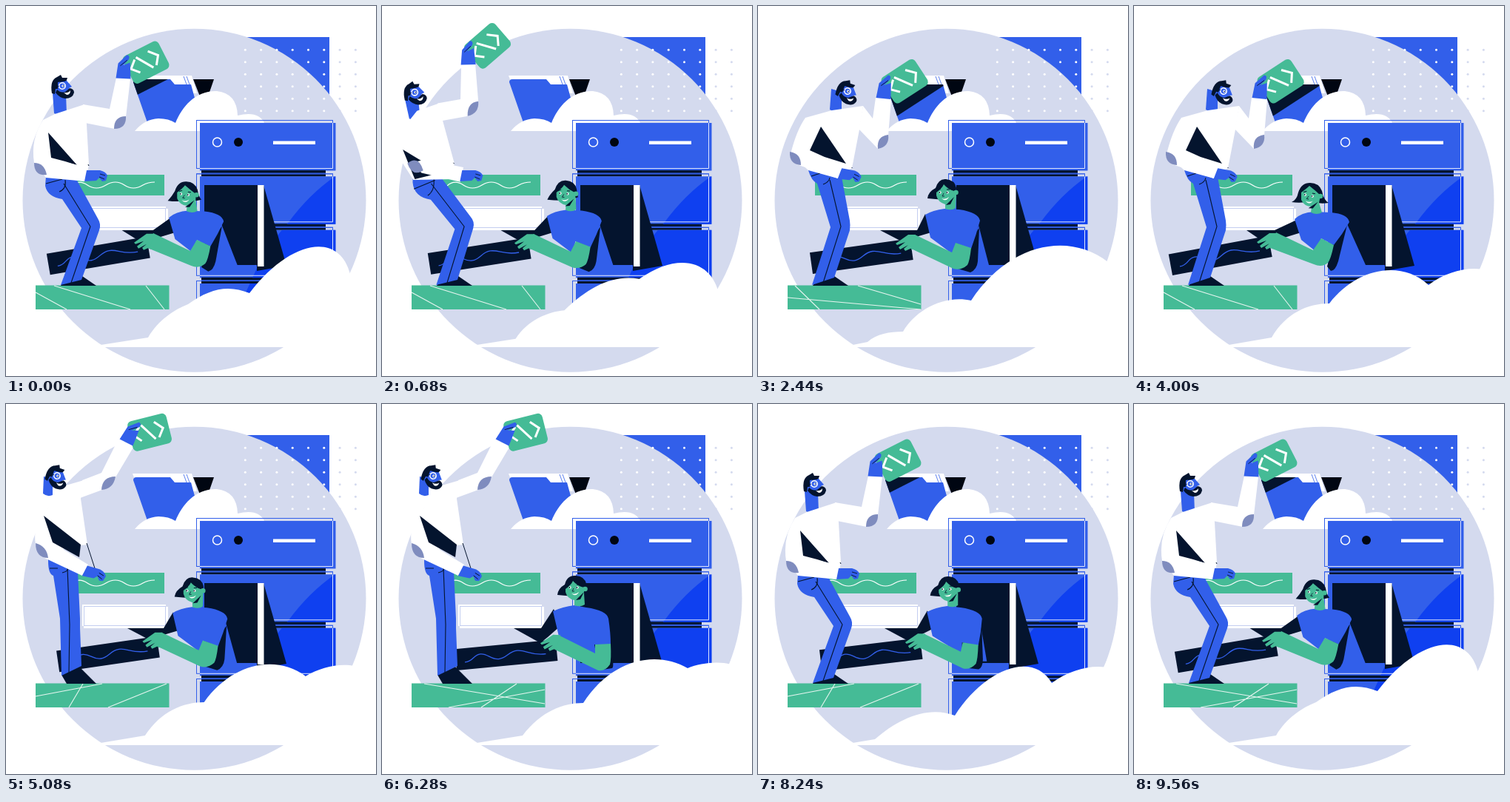
Animation, 500 px wide and 500 px high, one loop 9600 ms. Source, as an HTML page:

```html
<!DOCTYPE html>
<html lang="en">
<head>
<meta charset="utf-8">
<title>Cloud server</title>
<style>
html, body { margin: 0; width: 100%; height: 100%; overflow: hidden; background: #fff; }
svg { display: block; width: 100vw; height: 100vh; }
</style>
</head>
<body>
<svg id="stage" viewBox="0 0 500 500" fill="none"></svg>
<script>
const LOOP = 9600;
const BLUE = '#325fea', DEEP = '#0f40f0', DARK = '#04142e', GREEN = '#45bb96';
const PALE = '#d4daee', WHITE = '#fff', PATCH = '#7f8cbe';
const stage = document.getElementById('stage');

function el(tag, attrs, parent = stage) {
  const n = document.createElementNS('http://www.w3.org/2000/svg', tag);
  for (const k in attrs) n.setAttribute(k, attrs[k]);
  return parent.appendChild(n);
}
const shape = (d, fill, parent) => el('path', { d, fill }, parent);
const line = (d, stroke, w = 1, parent) => el('path', { d, stroke, 'stroke-width': w }, parent);
const box = (x, y, w, h, fill, parent) => el('rect', { x, y, width: w, height: h, fill }, parent);
const disc = (cx, cy, r, fill, parent) => el('circle', { cx, cy, r, fill }, parent);

// Blend two strings that differ only in their numbers.
const NUM = /-?\d+(\.\d+)?/g;
function mix(a, b, k) {
  if (k <= 0) return a;
  if (k >= 1) return b;
  const nums = b.match(NUM);
  let i = 0;
  return a.replace(NUM, v => (+v + (nums[i++] - v) * k).toFixed(2));
}
// Finds the two neighbouring keys and the eased share between them.
function span(keys, t) {
  let i = 0;
  while (i < keys.length - 2 && t >= keys[i + 1][0]) i++;
  const [t0, a] = keys[i], [t1, b] = keys[i + 1];
  const k = Math.min(1, Math.max(0, (t - t0) / (t1 - t0)));
  return [a, b, (1 - Math.cos(Math.PI * k)) / 2];
}

const manParts = [], girlParts = [];
function morph(list, poses, fill, stroke, w = 1) {
  const n = el('path', fill ? { fill } : { stroke, 'stroke-width': w });
  list.push([n, 'd', poses]);
}
function rigid(list, poses, parent) {
  const n = el('g', {}, parent);
  list.push([n, 'transform', poses.map(([x, y, r]) => `translate(${x} ${y}) rotate(${r})`)]);
  return n;
}

// Backdrop
box(323, 42, 114, 100, BLUE);
disc(254.5, 262.8, 232, PALE);
for (let r = 0; r < 6; r++)
  for (let c = 0; c < 8; c++)
    disc(323.3 + c * 21.3, 59.3 + r * 16.5, 1.5, c < 6 ? WHITE : PALE);

// Folder
const FRONT = 'M172 103Q172 99 176 99L222 99L228 106L250 106L262 150L240 169L195 169Z';
shape(FRONT, '', el('clipPath', { id: 'front' }));
shape('M253 99H281L272 125L262 122Z', '#000612');
shape('M171 94H251L258 118H180Z', WHITE);
shape(FRONT, BLUE);
line('M240 95L244 106M244 95L248 106', BLUE, .8);
const shade = el('g', { 'clip-path': 'url(#front)' });
const CARD = [[189, 76, -27], [124.5, 45, -46], [198, 101.5, -33], [194, 38, -14]];
box(-60, -20, 120, 54, DARK, rigid(manParts, CARD, shade));
shape('M174 169Q187 153 206 152Q220 152 229 158C238 136 256 114 285 115Q312 118 313 148Q341 141 349 158V169Z', WHITE);

// Server
const units = [154, 226.3, 298.8, 371];
units.forEach((y, i) => {
  el('rect', { x: 257.5, y: y + .5, width: 184, height: 65, stroke: BLUE });
  box(262, y + 4, 183.5, 64.5, BLUE);
  if (i < 3) {
    box(264, y + 68, 168, 8.5, DARK);
    box(264, y + 71.5, 168, 1, BLUE);
  }
});
const lit = el('clipPath', { id: 'lit' });
units.slice(1).forEach(y => box(262, y + 4, 183.5, 64.5, '', lit));
el('path', { d: 'M445 230Q410 254 382 292L350 330L300 440H446Z', fill: DEEP, 'clip-path': 'url(#lit)' });
units.forEach(y => line(`M262 ${y + 65.5}H441.5V${y + 4}`, '#dfe6ff'));
units.slice(1).forEach(y => line(`M257.5 ${y + 4}V${y + .5}H441.5V${y + 4}`, BLUE));
el('circle', { cx: 285.5, cy: 184, r: 6, stroke: WHITE, 'stroke-width': 1.5 });
disc(314, 184, 6, '#000612');
box(361, 182.5, 57, 4.5, WHITE);
box(268, 242, 72, 108, DARK);
shape('M348 242L379 351L339 358V350Z', DARK);
box(340, 242, 8.5, 110, WHITE);

// Boards
box(77, 228, 137, 28, GREEN);
line('M88 243Q98 234 110 242T135 242T160 242T185 242Q192 238 201 238', WHITE, 1.2);
const plank = rigid(girlParts, [[52, 364, -10.5], [74, 362, -8], [101, 360, -5.4]]);
box(0, -29, 137, 29, DARK, plank);
line('M12 -10C24 -10 24 -19 34 -19S47 -10 58 -10S72 -19 84 -19S102 -10 122 -11', BLUE, 1.3, plank);
box(105, 274, 114, 29, WHITE);
box(103, 271, 113, 29, WHITE);
el('rect', { x: 105.5, y: 273.5, width: 110, height: 26, stroke: '#c3cdf0' });

// Woman
morph(girlParts, [
  'M152 303L190 303L222 288L226 306L187 318L174 318Z',
  'M165 303L215 303L226 281L234 306L207 314L192 317Z',
  'M178 303L215 303L232 277L241 300L224 315L214 323Z'], DARK);
morph(girlParts, [
  'M285 288L313 350L272 350L280 320Z',
  'M298 296L312 350L292 350L290 330Z',
  'M304 300L306 345L306 345L304 330Z'], BLUE);
morph(girlParts, [
  'M288 296L276 345Q272 358 266 358L261 352L270 318Z',
  'M299 300L297 345Q296 356 287 360L270 355L280 325Z',
  'M306 300L312 345Q313 356 311 357L298 359L300 330Z'], DARK);
morph(girlParts, [
  'M217 288Q226 279 243 278L266 279Q289 281 291 292Q282 308 270 323L253 314L246 332L226 316Z',
  'M226 282Q236 276 252 274L272 275Q298 279 300 290Q295 309 288 328L266 320L264 336L233 313Z',
  'M231 280Q244 274 260 272L276 275Q304 279 306 290Q309 310 309 325L287 325L290 341L239 314Z'], BLUE);
morph(girlParts, [
  'M253 314L270 323Q266 342 262 347Q254 354 243 349L184 327L192 306L242 330Z',
  'M267 320L288 327Q286 345 283 350Q274 358 264 355L205 327L212 309L262 333Z',
  'M288 325L309 324Q310 345 308 352Q301 362 292 360L232 331L240 313L288 337Z'], GREEN);
const palm = rigid(girlParts, [[188, 316, 0], [208, 318, 0], [236, 321, 2]]);
shape('M5 -9L-5 -9L-22 3L-20 5L-9 1L-18 8L-16 11L-5 5L-11 10L-9 13L0 9L1 11L-1 12Z', GREEN, palm);
morph(girlParts, [
  'M213 265Q220 262 222 252Q226 239 238 239Q250 239 254 250Q256 262 263 266Q250 268 240 264Q225 267 213 265Z',
  'M229 260Q230 251 240 246Q244 233 254 234Q266 235 268 246Q268 250 266 254Q262 258 252 262Q240 261 229 260Z',
  'M237 258Q238 249 247 244Q250 231 262 232Q274 233 276 243Q276 248 274 252Q270 256 260 260Q248 259 237 258Z'], DARK);
morph(girlParts, [
  'M226 252Q234 246 237 243Q246 250 252 256L250 266L254 279Q247 283 239 279L240 271Q230 271 226 262Z',
  'M241 252Q249 246 251 241Q257 248 265 250L268 256L267 273Q262 277 253 274L253 268Q243 265 241 256Z',
  'M248 250Q256 244 258 239Q264 246 273 248L273 256L274 271Q268 275 260 272L260 265Q250 263 248 254Z'], GREEN);
disc(0, 0, 3.3, GREEN, rigid(girlParts, [[252, 257, 0], [267.5, 252, 0], [274.5, 250, 0]]));
const look = rigid(girlParts, [[236, 257, 12], [251, 253, 0], [259, 249, 0]]);
for (const x of [-5, 5]) {
  disc(x, -1, 1.7, WHITE, look);
  disc(x - .6, -1, .9, DARK, look);
}
line('M-8 -4L-4 -6M4 -5L8 -5', DARK, 1, look);
line('M0 0L-2 4H1', DARK, .8, look);
shape('M-3 7Q3 9 7 5Q5 10 0 9Z', WHITE, look);
shape('M3 16L14 5L9 15Z', DARK, look);

// Green base with changing scratches
box(40, 377.5, 180.5, 32.5, GREEN);
const scratch = line('', '#e6f5f0', 1.1);
const SCRATCHES = [
  'M40 387L82 410M65 378L168 410M189 378L214 410',
  'M40 395L130 378M104 378L85 410M217 378L138 410',
  'M50 378L83 410M135 378L220 403M40 394L220 410',
  'M57 378L220 405M90 410L220 386M182 378L134 410'];

// Man
morph(manParts, [
  'M74 378L79 369L103 365L122 378Z', 'M74 378L79 369L103 365L122 378Z',
  'M74 378L79 369L103 365L122 378Z', 'M82 378L75 366L98 354L122 378Z'], DARK);
morph(manParts, [
  'M54 230L95 234L124 287Q129 295 126 303L102 370L74 377L102 300L76 261Q56 258 53 243Z',
  'M37 234L72 228L118 284Q125 291 122 300L102 370L73 377L97 302L62 262Q38 258 37 236Z',
  'M68 220L113 231L124 290Q125 296 124 303L103 367L73 377L98 299L80 240Q72 236 68 222Z',
  'M57 208L97 226L100 290Q100 297 100 303L102 354L75 367L73 290L64 232Q57 230 57 212Z'], BLUE);
morph(manParts, [
  'M78 240L114 298L88 374', 'M62 240L110 298L88 374',
  'M97 235L112 298L88 374', 'M83 222L86 298L85 363'], '', DARK, 1.1);
morph(manParts, [
  'M54 240L76 234M80 235Q82 247 72 251', 'M39 250L70 236M66 232Q68 250 58 258',
  'M72 230L84 226M97 232Q96 238 88 241', 'M59 222L70 222M84 222Q84 226 76 228'], '', DARK, 1.1);
// neck
morph(manParts, [
  'M63 118L81 120L82 146Q73 150 65 145Z', 'M19 130L37 132L40 153Q33 158 26 155Z',
  'M99 112L113 116L113 141Q105 145 97 140Z', 'M51 98L63 100L63 123Q56 126 50 121Z'], BLUE);
morph(manParts, [
  'M50 154L66 146L106 133L109 160L112 214L108 237L54 232L38 212Q33 180 50 154Z',
  'M28 160L40 140L66 131L72 154L92 211L92 233L38 236L20 206Q16 180 28 160Z',
  'M64 151L100 141L142 135L137 167L127 219L108 233L68 222L44 200Q52 168 64 151Z',
  'M50 151L74 112L105 103L101 128L110 190L101 191L57 200L40 190Q36 165 50 151Z'], WHITE);
morph(manParts, [
  'M111 214L112 216', 'M91 211L92 212', 'M127 218L127 219', 'M109 188L120 222'], '', DARK);
morph(manParts, [
  'M104 133L140 139L149 97L168 98L162 150L147 166L107 158Z',
  'M64 131L93 121L91 72L110 71L118 122L104 142L72 154Z',
  'M142 135L155 152L159 124L180 126L176 175L162 193L136 166Z',
  'M103 103L129 93L152 47L173 57L148 99L130 116L100 127Z'], WHITE);
morph(manParts, [
  'M146 166Q146 149 162 149Q163 166 146 166Z',
  'M104 142Q103 123 118 121Q119 138 104 142Z',
  'M162 193Q160 176 176 174Q178 190 162 193Z',
  'M129 116Q130 98 148 98Q145 115 129 116Z'], PATCH);
const card = rigid(manParts, CARD);
el('rect', { x: -27, y: -20.5, width: 54, height: 41.5, rx: 6, fill: GREEN }, card);
line('M-12 -10L-22 -1L-13 9M-9 -12L6 11M9 -12L19 -1L11 10', WHITE, 3, card);
const grip = rigid(manParts, [[158.5, 98, 3], [100.5, 72, -3], [169.5, 125, 6], [162.5, 52, 27]]);
shape('M-10 0L-8 -20L3 -32Q8 -32 6 -26L-1 -18L8 -22L10 0Z', BLUE, grip);
line('M-5 -17L4 -25', DARK, .9, grip);
morph(manParts, [
  'M57 171L96 215L80 210L61 205Z', 'M17 203L72 228L56 237L38 245Z',
  'M85 163L119 213L90 204L70 195Z', 'M51 151L101 190L99 207L63 187Z'], DARK);
morph(manParts, [
  'M40 210L58 206L110 218L106 237L52 229Z', 'M40 213L56 208L110 218L106 238L54 224Z',
  'M44 199L62 193L114 216L108 233L52 214Z', 'M42 190L60 186L111 217L103 232L52 208Z'], WHITE);
morph(manParts, [
  'M38 212Q52 212 55 228Q38 230 38 212Z', 'M33 213Q48 197 56 220Q42 232 33 213Z',
  'M43 197Q58 199 58 215Q42 214 43 197Z', 'M40 188Q55 192 57 208Q40 208 40 188Z'], PATCH);
const hand = rigid(manParts, [[108, 229, 0], [107, 229, 0], [111, 226, 10], [107, 225, 16]]);
shape('M1 -7L19 -7Q27 -5 29 0L27 7L22 8L18 3L14 7L-2 8Z', BLUE, hand);
line('M19 -2L26 0M18 2L25 5', DARK, .9, hand);

const head = rigid(manParts, [[76, 108, 0], [32, 120, -5], [121, 115, 20], [69, 97, 20]]);
shape('M-14 10Q-17 -8 -7 -12L-2 -15L0 -11L7 -11L5 -5L-4 -2L-6 12Z', DARK, head);
shape('M-6 -5L6 -7L13 1L9 3L9 12L-4 15L-10 11L-9 4L-6 4Z', BLUE, head);
shape('M-7 5Q-2 10 4 8L10 3Q16 4 16 9Q14 17 4 17Q-4 16 -9 9Z', DARK, head);
shape('M2 9Q8 10 11 6Q11 12 6 12Z', WHITE, head);
el('circle', { r: 4.2, fill: BLUE, stroke: WHITE, 'stroke-width': 1.6 }, head);
disc(1, 0, 1.7, WHITE, head);
disc(1.4, 0, .8, DARK, head);
line('M-3 -6L4 -7', DARK, 1.4, head);
line('M-4 0L-9 2', DARK, .8, head);

// Front cloud
const cloud = shape('', WHITE);
const CLOUDS = [
  'M128 458L192 448C206 424 228 410 246 403C275 382 300 376 329 388C385 315 450 305 465 362L470 461L128 461Z',
  'M128 458L167 452C185 425 220 417 247 421C285 375 330 346 370 346C420 350 446 390 446 432L446 461L128 461Z',
  'M128 458L148 454C160 443 178 440 196 440C212 412 250 390 288 398C340 320 420 305 473 346L473 461L128 461Z',
  'M128 458L186 448C205 415 235 402 264 402C300 355 360 342 398 377C420 360 450 352 471 356L471 461L128 461Z',
  'M128 458L190 448C215 415 245 404 272 404C310 345 370 332 413 357C430 350 455 347 471 352L471 461L128 461Z',
  'M128 458L158 453C190 425 230 407 266 421C305 360 370 332 397 377C420 360 450 352 471 356L471 461L128 461Z'];

const MAN = [[60, 0], [1020, 1], [1580, 1], [2440, 2], [4000, 2], [5040, 3], [6360, 3], [7440, 0], [LOOP, 0]];
const GIRL = [[0, .35], [1440, 1], [2440, 1], [4000, 0], [6280, 2], [8240, 1.46], [9540, .35], [LOOP, .35]];
const CLOUD = [[0, 0], [1440, 1], [2440, 2], [4000, 3], [6280, 4], [8240, 5], [9560, 0], [LOOP, 0]];

function pose(list, a, b, k) {
  for (const [node, attr, poses] of list) node.setAttribute(attr, mix(poses[a], poses[b], k));
}
function draw(t) {
  pose(manParts, ...span(MAN, t));
  const [p, q, k] = span(GIRL, t);
  const u = p + (q - p) * k, i = Math.min(1, Math.floor(u));
  pose(girlParts, i, i + 1, u - i);
  const [a, b, c] = span(CLOUD, t);
  cloud.setAttribute('d', mix(CLOUDS[a], CLOUDS[b], c));
  scratch.setAttribute('d', SCRATCHES[[0, 0, 1, 2, 3][Math.floor(t / 640) % 5]]);
}
const start = performance.now();
function tick() {
  draw((performance.now() - start) % LOOP);
  requestAnimationFrame(tick);
}
tick();
</script>
</body>
</html>
```
